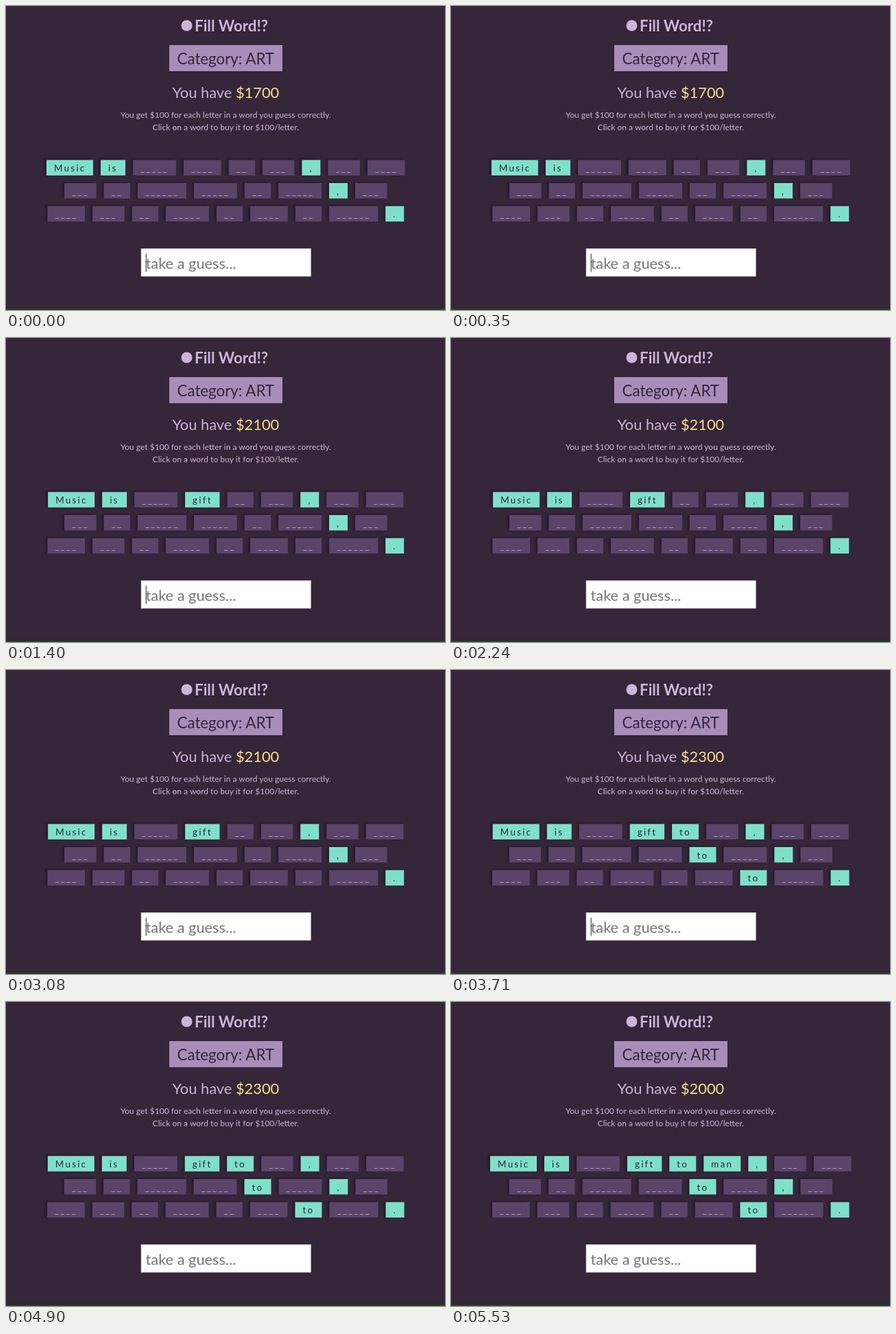
These frames come from a looping animation (640 px wide and 443 px high, 5600 ms). An HTML page:

```html
<!DOCTYPE html>
<html lang="en">
<head>
<meta charset="utf-8">
<title>Word guessing game</title>
<style>
  html, body { margin: 0; width: 100%; height: 100%; overflow: hidden; background: #352639; }
  svg { display: block; width: 100%; height: 100%; }
  text { font-family: Lato, sans-serif; white-space: pre; }
  .mid { text-anchor: middle; }
  .big { font-size: 22.3px; }
  .small { font-size: 12.07px; }
  .tile { font-size: 13.5px; }
  .word { letter-spacing: 2.2px; fill: #2d2433; }
  .blank { fill: #c3acd0; }
</style>
</head>
<body>
<svg viewBox="0 0 640 443">
  <defs>
    <filter id="soft" x="-20%" y="-30%" width="140%" height="160%"><feGaussianBlur stdDeviation="1"/></filter>
  </defs>
  <rect width="640" height="443" fill="#352639"/>
  <rect y="441.6" width="640" height="1.4" fill="#12551a"/>
  <g fill="#cbb5d8">
    <circle cx="263.5" cy="28.5" r="8"/>
    <text x="275" y="37" font-size="22.4" font-weight="700">Fill Word!?</text>
    <text class="mid" x="320.4" y="133.5" font-size="21.85">You have <tspan id="money" fill="#f8e08e"></tspan></text>
    <text class="mid small" x="320.4" y="162.7">You get $100 for each letter in a word you guess correctly.</text>
    <text class="mid small" x="320.4" y="180.7">Click on a word to buy it for $100/letter.</text>
  </g>
  <rect x="238" y="57" width="165" height="38" fill="#a88dba"/>
  <text class="mid big" x="320.3" y="84.6" fill="#352639">Category: ART</text>
  <g id="tiles"></g>
  <rect x="197" y="353.5" width="247.5" height="40.5" fill="#fff" stroke="#bcb4c0" stroke-width=".6"/>
  <text id="entry" x="203.5" y="382.6" font-size="21.8"></text>
  <rect id="caret" y="361" width="1" height="26.5" fill="#222"/>
</svg>
<script>
const LOOP = 5600;
const HALF_BLINK = 640;
const BLUR = 4210;
const GAP = 11, PAD = 11, PITCH = 8.2, HEIGHT = 22.5;
const $ = id => document.getElementById(id);

// A tile is a shown word, a blank's length, or [word, step that reveals it].
const rows = [
  ["Music", "is", 5, ["gift", 1], ["to", 2], ["man", 3], ",", 3, 4],
  [3, 2, 6, 5, ["to", 2], 5, ",", 3],
  [4, 3, 2, 5, 2, 4, ["to", 2], 6, "."]
];
const wordWidth = { Music: 68, is: 36, gift: 50.4, to: 39, man: 54, ",": 27, ".": 27 };
const steps = [[0, 1700], [1190, 2100], [3570, 2300], [4970, 2000]];
const typing = [
  [0, ""], [630, "g"], [770, "gi"], [840, "gif"], [980, "gift"], [1190, ""],
  [3220, "t"], [3360, "to"], [3570, ""]
];

const lastBefore = (list, t) => list.reduce((n, e, i) => e[0] <= t ? i : n, 0);

function resolve(tile, step) {
  if (!Array.isArray(tile)) return tile;
  return step >= tile[1] ? tile[0] : tile[0].length;
}

function drawTile(tile, x, y, w) {
  const shown = typeof tile === "string";
  const box = (dx, dy, rest) =>
    `<rect x="${x + dx}" y="${y + dy}" width="${w}" height="${HEIGHT}" ${rest}/>`;
  const left = x + PAD;
  const label = shown
    ? `<text class="tile word" x="${left}" y="${y + 16.7}">${tile}</text>`
    : `<text class="tile blank" x="${Array.from({ length: tile }, (_, i) => (left + i * PITCH).toFixed(1)).join(" ")}" y="${y + 16.7}">${"_".repeat(tile)}</text>`;
  return box(-2.5, -1, 'fill="#251929" filter="url(#soft)"') +
    box(0, 0, `fill="${shown ? "#7fe0ca" : "#5b446a"}"`) + label;
}

function drawRow(row, r, step) {
  const tiles = row.map(tile => resolve(tile, step));
  const widths = tiles.map(t => wordWidth[t] || t * PITCH + 2 * PAD - 0.1);
  const total = widths.reduce((a, b) => a + b) + GAP * (tiles.length - 1);
  let x = 320.3 - total / 2;
  return tiles.map((tile, i) => {
    const part = drawTile(tile, x, 224.4 + r * 33.6, widths[i]);
    x += widths[i] + GAP;
    return part;
  }).join("");
}

let drawnStep = -1, drawnEntry = -1;

function render(t) {
  const step = lastBefore(steps, t);
  if (step !== drawnStep) {
    drawnStep = step;
    $("money").textContent = "$" + steps[step][1];
    $("tiles").innerHTML = rows.map((row, r) => drawRow(row, r, step)).join("");
  }
  const entry = lastBefore(typing, t);
  const [since, text] = typing[entry];
  if (entry !== drawnEntry) {
    drawnEntry = entry;
    $("entry").textContent = text || "take a guess...";
    $("entry").setAttribute("fill", text ? "#111" : "#757575");
    $("caret").setAttribute("x", text ? 203.7 + $("entry").getComputedTextLength() : 203.7);
  }
  const lit = t < BLUR && Math.floor((t - since) / HALF_BLINK) % 2 === 0;
  $("caret").setAttribute("visibility", lit ? "visible" : "hidden");
}

const start = performance.now();
function frame() {
  render((performance.now() - start) % LOOP);
  requestAnimationFrame(frame);
}
frame();
</script>
</body>
</html>
```
